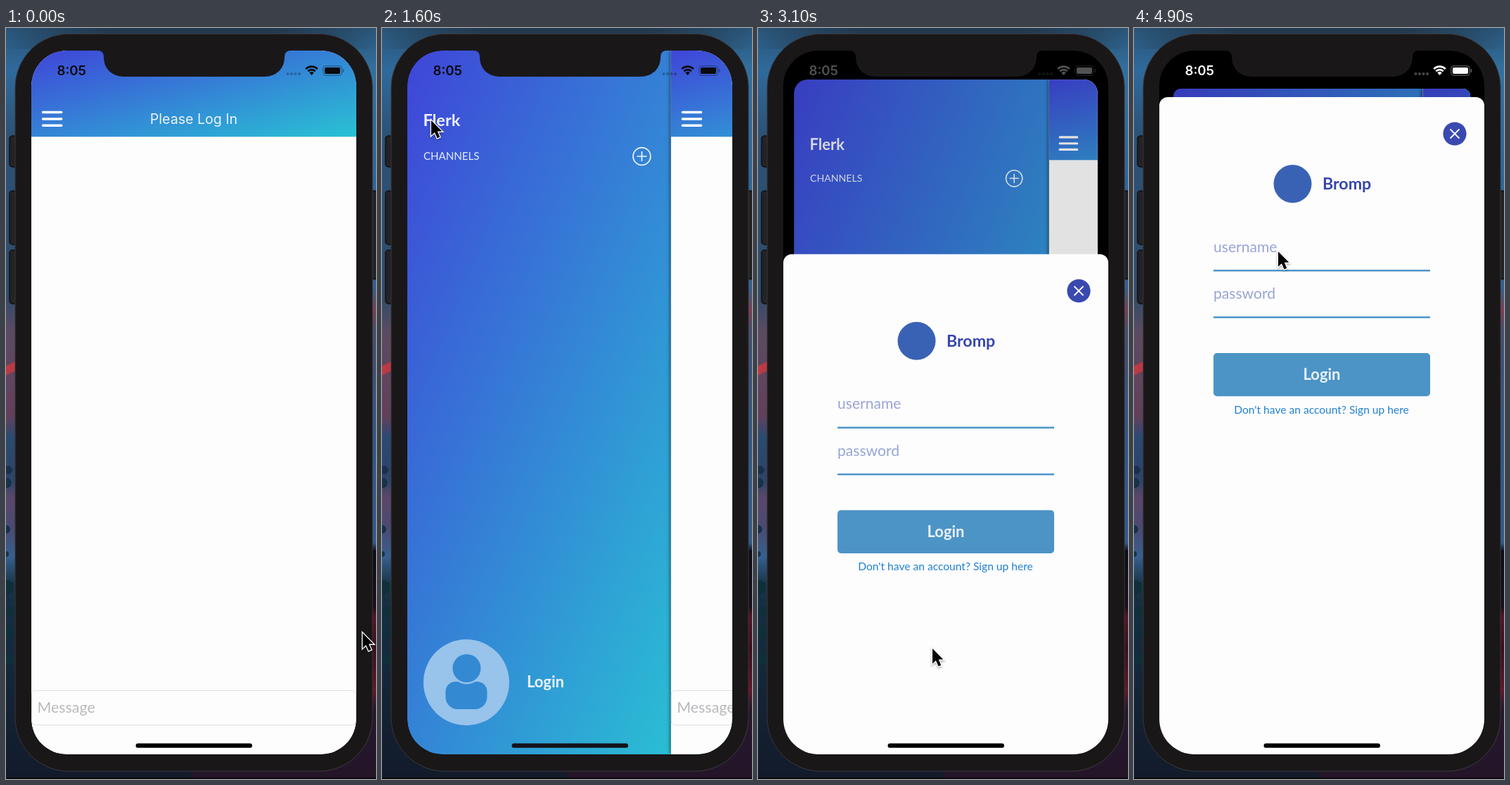
These frames come from a looping animation (526 by 1065 pixels, 5 s). An HTML page with a canvas:

```html
<!DOCTYPE html>
<html lang="en">
<head>
<meta charset="utf-8">
<title>Chat app login</title>
<style>
  html, body { margin: 0; width: 100%; height: 100%; overflow: hidden; background: #1a1719; }
  canvas { display: block; width: 100vw; height: 100vh; }
</style>
</head>
<body>
<canvas id="stage" width="526" height="1065"></canvas>
<script>
const ctx = document.getElementById('stage').getContext('2d');
const LOOP = 5000, STEP = 100;
const SCREEN = { x: 36, y: 32, w: 462, h: 998, r: 50 };
const REVEAL = 388;
const SHEET_TOP = 98, SCREEN_END = 1030;
const BLUE = '#3f45d8', CYAN = '#29c2d4', WHITE = '#fefdfe';
const LATO = 'Lato, "Open Sans", sans-serif';
const INTER = 'Inter, Roboto, sans-serif';

// time, x, y of the pointer tip
const POINTER = [
  [200, 507, 858], [1200, 70, 131], [1700, 70, 131], [2300, 219, 943],
  [2900, 219, 943], [3100, 248, 880], [3300, 296, 563], [3500, 285, 430],
  [4200, 243, 345], [4600, 205, 317]
];

const clamp = v => Math.max(0, Math.min(1, v));
const mix = (a, b, p) => a + (b - a) * p;

function box(x, y, w, h, r, fill) {
  ctx.beginPath();
  ctx.roundRect(x, y, w, h, r);
  if (fill) { ctx.fillStyle = fill; ctx.fill(); }
}

function disc(x, y, r, fill) {
  ctx.beginPath();
  ctx.arc(x, y, r, 0, Math.PI * 2);
  ctx.fillStyle = fill;
  ctx.fill();
}

function line(color, width, ...pts) {
  ctx.beginPath();
  for (let i = 0; i < pts.length; i += 4) {
    ctx.moveTo(pts[i], pts[i + 1]);
    ctx.lineTo(pts[i + 2], pts[i + 3]);
  }
  ctx.strokeStyle = color;
  ctx.lineWidth = width;
  ctx.stroke();
}

function text(str, x, y, size, color, weight = 400, family = LATO, align = 'left') {
  ctx.font = `${weight} ${size}px ${family}`;
  ctx.textAlign = align;
  ctx.fillStyle = color;
  ctx.fillText(str, x, y);
}

// gradient from corner to corner in the unit space of the box
function diagonal(x, y, w, h) {
  ctx.save();
  ctx.translate(x, y);
  ctx.scale(w, h);
  const g = ctx.createLinearGradient(0, 0, 1, 1);
  g.addColorStop(0, BLUE);
  g.addColorStop(1, CYAN);
  ctx.fillStyle = g;
  ctx.fillRect(0, 0, 1.25, 1);
  ctx.restore();
}

function vertical(x, w, stops) {
  const g = ctx.createLinearGradient(0, 0, 0, 1065);
  stops.forEach(([y, c]) => g.addColorStop(y / 1065, c));
  ctx.fillStyle = g;
  ctx.fillRect(x, 0, w, 1065);
}

function drawDesktop() {
  vertical(0, 263, [[0, '#2a5578'], [60, '#2f6a9c'], [150, '#2c5276'], [380, '#2f4c6c'],
    [430, '#5c4a62'], [550, '#62405c'], [580, '#2b4a70'], [640, '#2c4468'], [665, '#59476a'],
    [710, '#4a4a72'], [750, '#36608e'], [790, '#173246'], [900, '#14283a'], [1065, '#121a2a']]);
  vertical(263, 263, [[0, '#2a5578'], [60, '#33709f'], [230, '#2f6698'], [370, '#35608c'],
    [400, '#7a4052'], [430, '#46506f'], [600, '#315a88'], [730, '#335c8c'], [742, '#0c0d16'],
    [820, '#18101c'], [835, '#5a1426'], [880, '#381020'], [940, '#64172a'], [965, '#25192f'],
    [1065, '#241528']]);
  const g = ctx.createLinearGradient(0, 0, 526, 0);
  g.addColorStop(0, 'rgba(30,45,60,0)');
  g.addColorStop(0.3, '#22384c');
  g.addColorStop(0.7, '#22384c');
  g.addColorStop(1, 'rgba(30,45,60,0)');
  ctx.fillStyle = g;
  ctx.fillRect(0, 0, 526, 30);
  line('#bb3a44', 12, -4, 488, 16, 478);
  [[3, 627, 6], [1, 645, 7], [0, 711, 6], [0, 746, 4]].forEach(d => disc(...d, '#17324a'));
  [[1, 793, 10], [8, 826, 7], [2, 856, 9], [6, 895, 8]].forEach(d => disc(...d, '#0f2f3a'));
  ctx.fillStyle = '#08070b';
  ctx.fillRect(0, 1063, 526, 2);
}

function drawBody() {
  [[5, 153, 44], [5, 231, 76], [5, 315, 76], [514, 231, 125]].forEach(([x, y, h]) => {
    box(x, y, 16, h, 4, '#232224');
    ctx.strokeStyle = '#111012';
    ctx.lineWidth = 1.5;
    ctx.stroke();
  });
  box(13, 8.5, 508, 1045.5, 76, '#1a1719');
  ctx.strokeStyle = '#3a393b';
  ctx.lineWidth = 1;
  ctx.stroke();
}

function drawRear(shift) {
  ctx.save();
  ctx.translate(-47 * (1 - shift / REVEAL), 0);
  diagonal(36, 32, 400, 998);
  text('Flerk', 60, 139, 23.5, '#eef1fc', 700);
  text('CHANNELS', 60.5, 187, 15.1, '#e6edfa');
  ctx.beginPath();
  ctx.arc(371, 182, 12.4, 0, Math.PI * 2);
  ctx.strokeStyle = '#f2f6fd';
  ctx.lineWidth = 1.7;
  ctx.stroke();
  line('#f2f6fd', 1.7, 364, 182, 378, 182, 371, 175, 371, 189);
  disc(121.5, 928, 61, '#98c3ea');
  box(92, 927, 59, 39, [14, 14, 17, 17], '#3489d3');
  disc(122, 908, 22.5, '#98c3ea');
  disc(122, 908, 20, '#3489d3');
  text('Login', 207.5, 935, 22, '#eef4fc', 700);
  ctx.restore();
}

function drawFront(shift, pressed) {
  ctx.save();
  ctx.translate(shift, 0);
  if (shift) {
    ctx.shadowColor = 'rgba(0,0,0,.85)';
    ctx.shadowBlur = 6;
  }
  ctx.fillStyle = WHITE;
  ctx.fillRect(36, 32, 462, 998);
  ctx.shadowColor = 'transparent';
  ctx.beginPath();
  ctx.rect(36, 32, 462, 122.5);
  ctx.save();
  ctx.clip();
  diagonal(36, 32, 462, 122.5);
  ctx.restore();
  ctx.lineCap = 'round';
  line(pressed ? 'rgba(146,122,88,.75)' : WHITE, 3.4,
    52.5, 119.5, 78.8, 119.5, 52.5, 129, 78.8, 129, 52.5, 138.3, 78.8, 138.3);
  ctx.lineCap = 'butt';
  text('Please Log In', 267, 136.3, 19.6, '#eef4fd', 400, INTER, 'center');
  box(36.5, 939.5, 461, 49, 6);
  ctx.strokeStyle = '#dedde0';
  ctx.lineWidth = 1;
  ctx.stroke();
  text('Message', 44.5, 971, 21.4, '#b9b8bb');
  ctx.restore();
}

// menu and chat, pushed back while the sheet comes up
function drawApp(shift, pressed, p) {
  const k = 1 - 0.086 * p;
  ctx.save();
  ctx.translate(267, mix(32, 86, p));
  ctx.scale(k, k);
  ctx.translate(-267, -32);
  box(SCREEN.x, SCREEN.y, SCREEN.w, SCREEN.h, mix(SCREEN.r, 12, p));
  ctx.clip();
  if (shift) drawRear(shift);
  drawFront(shift, pressed);
  if (p) {
    ctx.fillStyle = `rgba(0,0,0,${0.14 * p})`;
    ctx.fillRect(36, 32, 462, 998);
  }
  ctx.restore();
}

function drawSheet(top) {
  ctx.save();
  ctx.translate(0, top);
  box(36, 0, 462, 1000, [12, 12, 0, 0], WHITE);
  disc(456, 52, 16.6, '#3a49b0');
  line('#f4f5fc', 1.9, 449.5, 45.5, 462.5, 58.5, 462.5, 45.5, 449.5, 58.5);
  disc(225.5, 123, 27, '#3a62b4');
  text('Bromp', 268, 131, 23.2, '#3646ae', 700);
  text('username', 113, 219.5, 21.1, '#96a5d4');
  text('password', 113, 286, 21.1, '#96a5d4');
  line('#4c95c8', 2.5, 113, 246, 421, 246, 113, 312.3, 421, 312.3);
  box(113, 363, 308, 61.3, 5, '#4c94c6');
  text('Login', 267, 401, 22, '#eaf1f8', 700, LATO, 'center');
  text("Don't have an account? Sign up here", 266.5, 448.5, 15.6, '#2080d0', 400, LATO, 'center');
  ctx.restore();
}

function drawStatus(color, alpha) {
  if (!alpha) return;
  ctx.save();
  ctx.globalAlpha = alpha;
  text('8:05', 72.5, 66.8, 18.6, color, 600, INTER);
  ctx.strokeStyle = color;
  ctx.lineWidth = 2.7;
  for (const r of [11.8, 7.4]) {
    ctx.beginPath();
    ctx.arc(434.5, 66.5, r, -Math.PI * 0.75, -Math.PI * 0.25);
    ctx.stroke();
  }
  ctx.beginPath();
  ctx.moveTo(434.5, 67);
  ctx.arc(434.5, 66.5, 4.4, -Math.PI * 0.75, -Math.PI * 0.25);
  ctx.fillStyle = color;
  ctx.fill();
  box(453, 56, 22, 9, 2, color);
  ctx.globalAlpha = alpha * 0.38;
  box(450.8, 53.8, 26.4, 13.4, 4);
  ctx.lineWidth = 1.2;
  ctx.stroke();
  box(478.6, 58, 1.6, 5, 1, color);
  ctx.globalAlpha = alpha * 0.28;
  [400.5, 406, 411.5, 417].forEach(x => disc(x, 65, 2, color));
  ctx.restore();
}

function drawNotch() {
  ctx.fillStyle = '#1a1719';
  ctx.fill(new Path2D('M130 30V32Q139 32 139 41C139 58 151 69 168 69H367C384 69 396 58 396 41Q396 32 405 32V30Z'));
}

function drawPointer(t) {
  let i = POINTER.findIndex(k => k[0] > t);
  if (i < 0) i = POINTER.length;
  const a = POINTER[Math.max(0, i - 1)], b = POINTER[Math.min(i, POINTER.length - 1)];
  const u = a === b ? 0 : clamp((t - a[0]) / (b[0] - a[0]));
  const e = u * u * (3 - 2 * u);
  ctx.save();
  ctx.translate(mix(a[1], b[1], e), mix(a[2], b[2], e));
  const arrow = new Path2D('M0 0V21.5L4.9 17L8.6 25.2L12.2 23.6L8.7 15.6H15.4Z');
  ctx.shadowColor = 'rgba(0,0,0,.35)';
  ctx.shadowBlur = 3;
  ctx.shadowOffsetY = 1.5;
  ctx.lineWidth = 2.6;
  ctx.strokeStyle = '#fff';
  ctx.stroke(arrow);
  ctx.shadowColor = 'transparent';
  ctx.fillStyle = '#000';
  ctx.fill(arrow);
  ctx.restore();
}

function draw(t) {
  const shift = REVEAL * (1 - Math.pow(1 - clamp((t - 1400) / 250), 2.1));
  // critically damped spring
  const s = Math.max(0, t - 2947) * 0.018;
  const p = 1 - (1 + s) * Math.exp(-s);
  const light = clamp((t - 3040) / 200);

  drawDesktop();
  drawBody();
  ctx.save();
  box(SCREEN.x, SCREEN.y, SCREEN.w, SCREEN.h, SCREEN.r, '#000');
  ctx.clip();
  drawApp(shift, t === 1400, p);
  if (p) drawSheet(mix(SCREEN_END, SHEET_TOP, p));
  drawStatus('#0a0a0c', 1 - light);
  drawStatus('#fff', light);
  box(184.5, 1014.5, 165.5, 6.3, 3.2, p || !shift ? '#000' : '#14121a');
  ctx.restore();
  drawNotch();
  drawPointer(t);
}

const start = performance.now();
function tick() {
  const t = (performance.now() - start) % LOOP;
  draw(Math.floor(t / STEP) * STEP);
  requestAnimationFrame(tick);
}
tick();
</script>
</body>
</html>
```
